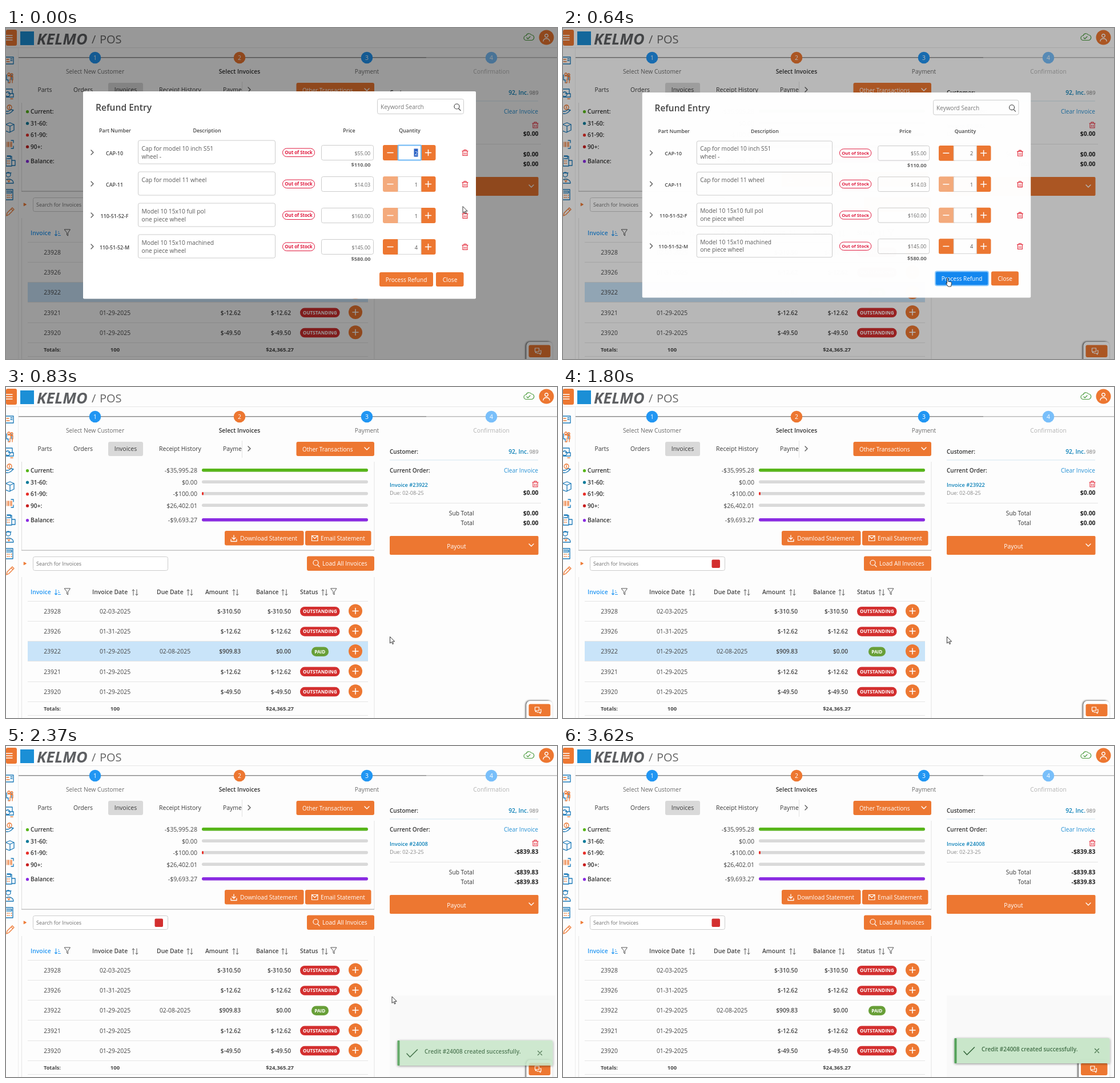
These frames come from a looping animation (965 by 580 pixels, 4320 ms). An HTML page:

```html
<!DOCTYPE html>
<html lang="en">
<head>
<meta charset="utf-8">
<title>Refund entry</title>
<style>
html, body { margin: 0; width: 100%; height: 100%; overflow: hidden; background: #fdfdfd; }
svg { display: block; font-family: "Open Sans", "Noto Sans", sans-serif; }
</style>
</head>
<body>
<svg id="stage" width="965" height="580" viewBox="0 0 965 580"></svg>
<script>
const ORANGE = '#ed7731', BLUE = '#2196f3', RED = '#d32f2f', INK = '#444';

// drawing helpers: each returns SVG markup
const text = (x, y, s, size = 10.4, fill = INK, weight = 400, anchor = 'start', extra = '') =>
  `<text x="${x}" y="${y}" font-size="${size}" fill="${fill}" font-weight="${weight}" text-anchor="${anchor}" ${extra}>${s}</text>`;
const mid = (x, y, s, size, fill, weight) => text(x, y, s, size, fill, weight, 'middle');
const end = (x, y, s, size, fill, weight) => text(x, y, s, size, fill, weight, 'end');
const rect = (x, y, w, h, fill, r = 0, extra = '') =>
  `<rect x="${x}" y="${y}" width="${w}" height="${h}" rx="${r}" fill="${fill}" ${extra}/>`;
const box = (x, y, w, h, stroke = '#ccc', r = 3) =>
  rect(x + .5, y + .5, w - 1, h - 1, '#fff', r, `stroke="${stroke}"`);
const disc = (x, y, r, fill) => `<circle cx="${x}" cy="${y}" r="${r}" fill="${fill}"/>`;
const path = (d, stroke = INK, w = 1.2, fill = 'none') =>
  `<path d="${d}" stroke="${stroke}" stroke-width="${w}" fill="${fill}" stroke-linecap="round" stroke-linejoin="round"/>`;
const line = (x1, y, x2, c = '#e5e5e5', w = 1) => rect(x1, y, x2 - x1, w, c);
const group = (id, body, extra = '') => `<g id="${id}" ${extra}>${body}</g>`;

// icons
const down = (x, y, c) => path(`M${x - 4} ${y - 2}l4 4 4-4`, c, 1.4);
const right = (x, y) => path(`M${x - 2} ${y - 4}l4 4-4 4`, '#555', 1.3);
const plus = (x, y, s = 5) => path(`M${x - s} ${y}h${2 * s}M${x} ${y - s}v${2 * s}`, '#fff', 1.5);
const minus = (x, y) => path(`M${x - 5} ${y}h10`, '#fff', 1.5);
const lens = (x, y, c) => path(`M${x + 3} ${y + 3}l3 3M${x + 4} ${y - 1}a4.5 4.5 0 1 1-9 0a4.5 4.5 0 1 1 9 0`, c, 1.2);
const trash = (x, y) => path(`M${x - 5} ${y - 3}h10M${x - 2} ${y - 3}v-2h4v2M${x - 4} ${y - 3}v8h8v-8M${x - 1.4} ${y}v3M${x + 1.4} ${y}v3`, '#e32636', 1.1);
const sort = (x, y) => path(`M${x - 3} ${y + 5}v-10l-2 2m2-2l2 2M${x + 3} ${y - 5}v10l-2-2m2 2l2-2`, '#555', 1);
const filter = (x, y) => path(`M${x - 5} ${y - 6}h10l-4 6v5l-2-1.5v-3.5z`, '#555', 1);
const cloud = path('M911 21.5a4 4 0 0 1 0-8a5 5 0 0 1 9-1.5a4.7 4.7 0 0 1 0 9.5zM912 17l2 2 4-4', '#4a9b3c', 1.2);

const button = (x, y, w, h, label, tx, size = 10.2) =>
  rect(x, y, w, h, ORANGE, 3) + text(tx, y + h / 2 + 4, label, size, '#fff');

function header() {
  const steps = [[156, 'Select New Customer', BLUE, '#6b6b6b'], [409, 'Select Invoices', ORANGE, '#333'],
                 [632, 'Payment', BLUE, '#6b6b6b'], [850, 'Confirmation', '#79bffa', '#b3b3b3']];
  return rect(0, 3, 19, 28, ORANGE, 3) + path('M0 13h11M0 17h11M0 21h11', '#fff', 1.5) +
    rect(25, 6, 24, 24, '#1b8fd6') +
    text(54, 28.5, 'KELMO', 27, '#5d5f62', 700, 'start', 'font-style="italic"') +
    text(150, 26.5, '/', 20, '#666') + text(164, 26.5, 'POS', 20, '#666') +
    cloud + disc(946.5, 16.5, 13, ORANGE) +
    path('M941 23c0-6 11-6 11 0M949.3 13.5a2.8 2.8 0 1 1-5.6 0a2.8 2.8 0 1 1 5.6 0', '#fff', 1.4) +
    line(0, 34, 965, '#e6e6e6') + rect(21, 35, 1, 545, '#ececec') +
    line(22, 51, 736, '#8c8c8c', 1.5) + line(736, 51, 965, '#bcbcbc', 1.5) +
    steps.map(([x, s, c, ink], i) => disc(x, 52, 10.3, c) + mid(x, 56, i + 1, 10.5, '#fff') +
      mid(x, 80, s, 10.3, ink, i == 1 ? 600 : 400)).join('');
}

function sidebar() {
  const shapes = [
    ['M0 51h13v12h-13M8 54h3M8 57h3', 'M1 59h5M1 55h4'],
    ['M1 82v9h3v4M10 82v9', 'M5 79a2 2 0 1 0 .1 0M3 84h5v6h-1v6h-3M10 80a2 2 0 1 0 .1 0M9 85h3v6h-1v5'],
    ['M0 107h11v7M0 121h13v-6h-9M3 112a4 4 0 1 0 .1 0', 'M8 124h4'],
    ['M0 150c5 1 8-1 13-6l-4-1-5 3h-4', 'M6 135a4 4 0 1 0 .1 0M6 137v4'],
    ['M-1 169l8-3 7 3v10l-8 4-7-3M-1 169l8 3 7-3M7 172v10', ''],
    ['M9 197h4v4M13 207v4h-4', 'M0 200v8M3 200v8M5 200v8M8 200v8M10 200v8'],
    ['M0 227v15h10v-17h-8M10 232h6v9h-6M2 224h6v5h-6', 'M2 233h1M5 233h1M2 237h1M5 237h1'],
    ['M8 257a4 4 0 1 1-8 0a4 4 0 1 1 8 0M0 254h9M0 266c6-3 13 0 13 6h-13', 'M3 266l2 4 2-4'],
    ['M0 283h12v18h-12M1 286h9v3h-9', 'M2 293h1M5 293h1M9 293h1M2 297h1M5 297h1M9 297h1'],
    ['', 'M1 329l1-5 9-9 3 3-9 9-4 2M9 317l3 3']];
  return shapes.map(([a, b]) => path(a, '#1878b8', 1.3) + path(b, ORANGE, 1.3)).join('');
}

function balances() {
  const rows = [[146, 'Current:', '-$35,995.28', '#57b51a', 291], [166.5, '31-60:', '$0.00', '#0f7b9a', 0],
                [187, '61-90:', '-$100.00', '#e8302a', 3], [207.5, '90+:', '$26,402.01', '#c81e1e', 0],
                [233, 'Balance:', '-$9,693.27', '#8a2be2', 291]];
  return rect(27, 131, 1, 155, '#ddd') + rect(644.5, 131, 1, 155, '#e4e4e4') + line(27, 285.5, 645, '#bbb', 1.3) +
    rows.map(([y, s, v, c, w]) => disc(37.5, y + .7, 2.6, c) + text(43, y + 4, s, 10.2, '#333', 600) +
      end(335, y + 4, v, 10.6) + rect(343, y - 3, 291, 5.5, '#d9d9d9', 2.7) +
      rect(343, y - 3, w, 5.5, c, Math.min(2.7, w / 2))).join('') +
    button(383, 252, 138.5, 25.5, 'Download Statement', 410) +
    path('M399 260v7l-3-3m3 3l3-3M394 267v3.5h10v-3.5', '#fff', 1.3) +
    button(524, 252, 115.5, 25.5, 'Email Statement', 551) +
    path('M535.5 260.5h10.5v9h-10.5zl5.2 5 5.3-5', '#fff', 1.2);
}

function tabs() {
  return rect(179, 96, 61, 25, '#d9d9d9', 3) +
    [[68, 'Parts'], [135, 'Orders'], [209.5, 'Invoices'], [305, 'Receipt History']]
      .map(([x, s]) => mid(x, 112, s, 10.5, '#3a3a3a', 500)).join('') +
    text(380, 112, 'Payme', 10.4, '#3a3a3a', 500) + rect(413, 94, 1, 30, '#e2e2e2') + right(426, 108) +
    button(508.5, 96, 136.5, 25, 'Other Transactions', 519, 10) + down(632, 108, '#fff');
}

function invoices() {
  const cols = [[43, 'Invoice'], [151, 'Invoice Date', 226], [264, 'Due Date', 322],
                [349, 'Amount', 402], [438, 'Balance', 488], [515, 'Status', 558]];
  const rows = [['23928', '02-03-2025', '$-310.50'], ['23926', '01-31-2025', '$-12.62'],
                ['23922', '01-29-2025', '$909.83'], ['23921', '01-29-2025', '$-12.62'],
                ['23920', '01-29-2025', '$-49.50']];
  return path('M31.5 307l4 2.3-4 2.3z', ORANGE, 1, ORANGE) + box(47, 297, 237, 25) +
    text(53, 313, 'Search for Invoices', 9, '#6f6f6f') + rect(260.5, 302.5, 14.5, 14.5, RED, 2, 'id="badge"') +
    button(527, 296.5, 118, 25.5, 'Load All Invoices', 554) + lens(543, 309, '#fff') +
    rect(27, 333, 1, 247, '#e4e4e4') + rect(644.5, 333, 1, 247, '#e4e4e4') +
    cols.map(([x, s, at], i) => text(x, 363, s, 10.4, i ? '#444' : BLUE, 600) + (at ? sort(at, 360) : '')).join('') +
    path('M87.5 355v9l-2-2m2 2l2-2M91.5 357h1M91.5 360h2.5M91.5 363.5h4', BLUE, 1.1) +
    filter(107.5, 359) + filter(574, 359) +
    rect(38, 445.5, 596, 35, '#c9e4f9', 0, 'id="selected"') +
    [375, 410, 445, 480, 516, 551, 575].map(y => line(38, y, 634)).join('') +
    rows.map(([id, date, sum], i) => {
      const y = 393 + i * 35.2, paid = i == 2;
      return mid(81, y + 4, id, 10.4) + mid(191, y + 4, date, 10.4) +
        (paid ? mid(296, y + 4, '02-08-2025', 10.4) : '') +
        end(411, y + 4, sum, 10.2, INK, 600) + end(499, y + 4, paid ? '$0.00' : sum, 10.2, INK, 600) +
        (paid ? rect(535, y - 8, 30, 16.5, '#689f38', 8) : rect(515, y - 8, 69.5, 16.5, RED, 8)) +
        mid(549.8, y + 3.2, paid ? 'PAID' : 'OUTSTANDING', 8.2, '#fff', 700) +
        disc(612, y - .5, 12, ORANGE) + plus(612, y - .5);
    }).join('') +
    text(66, 567, 'Totals:', 9.2, INK, 700) + mid(191, 567, '100', 9.5, INK, 700) + end(504, 567, '$24,365.27', 9.5, INK, 700);
}

function order() {
  return text(672, 117, 'Customer:', 10, '#333', 600) + end(915, 117, '92, Inc.', 10.3, '#0a80b8', 600) +
    end(932.5, 117, '989', 9.4, '#777') + rect(672, 127.5, 260, 1, '#d3e7f2') +
    text(672, 150, 'Current Order:', 10, '#333', 600) + end(932, 150, 'Clear Invoice', 10.1, '#2490d4') +
    text(672, 175, '', 9.3, '#0a80b8', 600, 'start', 'id="invoice"') +
    text(672, 189, '', 9.2, '#888', 400, 'start', 'id="due"') + trash(927, 170) + line(672, 203, 937) +
    [[189, ''], [225, 'Sub Total'], [242, 'Total']].map(([y, s]) => end(819.5, y, s, 10.2, '#333') +
      text(932.5, y, '', 10.4, '#222', 700, 'end', 'class="sum"')).join('') +
    rect(672, 261, 260.5, 33, ORANGE, 2) + mid(789, 282.5, 'Payout', 10.3, '#fff') + down(920, 277, '#fff');
}

function modal() {
  const rows = [['CAP-10', 'Cap for model 10 inch S51', 'wheel -', '$55.00', 2, '$110.00'],
                ['CAP-11', 'Cap for model 11 wheel', '', '$14.03', 1, ''],
                ['110-51-52-F', 'Model 10 15x10 full pol', 'one piece wheel', '$160.00', 1, ''],
                ['110-51-52-M', 'Model 10 15x10 machined', 'one piece wheel', '$145.00', 4, '$580.00']];
  return rect(135, 111, 688, 363.5, '#fff', 2) + text(157, 144.5, 'Refund Entry', 15.6, INK, 600) +
    box(650, 124, 152, 27) + text(656, 142, 'Keyword Search', 10.2, '#777') + lens(790, 138.5, '#444') +
    [[191, 'Part Number'], [352, 'Description'], [601, 'Price'], [707, 'Quantity']]
      .map(([x, s]) => mid(x, 182.5, s, 8.9, INK, 600)).join('') +
    rows.map(([part, a, b, price, n, total], i) => {
      const y = 218.5 + i * 55;
      return right(151, y - .5) + mid(190, y + 4, part, 8.9, INK, 600) + box(231, y - 22, 241, 42) +
        text(237.5, y - 4, a, 10.3, '#5a5a5a') + text(237.5, y + 10, b, 10.3, '#5a5a5a') +
        rect(484.5, y - 7.5, 56, 14.5, '#fff', 7.2, 'stroke="#e0173c"') +
        mid(512.5, y + 2.8, 'Out of Stock', 7.9, '#e0173c', 700) +
        box(552, y - 13.5, 92, 27) + end(638, y + 4, price, 8.8, '#666') + end(638.5, y + 24.5, total, 9.2, '#666', 700) +
        rect(660, y - 13.5, 30, 27, n > 1 ? ORANGE : '#f4aa7c', 3) + rect(724, y - 13.5, 28.5, 27, ORANGE, 3) +
        box(686, y - 13.5, 41.5, 27, '#d5d5d5', 0) +
        (i ? '' : group('focus', rect(686.5, y - 13, 40.5, 26, 'none', 1, 'stroke="#6db8f5" stroke-width="2"')) +
          rect(714.5, y - 7, 7, 14, '#2b62c4', 0, 'id="mark"')) +
        text(721, y + 4, n, 9.3, '#555', 400, 'end', `id="qty${i}"`) +
        minus(673, y) + plus(739.5, y) + trash(804, y);
    }).join('') +
    group('rules', [[246, 749], [301, 749], [355, 796], [410, 749]].map(([y, x]) => line(653, y, x)).join('')) +
    rect(654, 428, 94, 25, ORANGE, 3, 'id="process" stroke-width="2"') + mid(701, 444.5, 'Process Refund', 10.1, '#fff') +
    rect(753, 428, 48.5, 25, ORANGE, 3) + mid(777.5, 444.5, 'Close', 10.2, '#fff');
}

const chat = rect(0, 550, 70, 50, '#fff', 7, 'id="card" filter="url(#deep)"') +
  rect(0, 555.5, 40, 21.5, ORANGE, 3, 'id="chatButton"') +
  group('chatIcon', path('M-5-5h7v6h-4l-2 2v-2h-1zM4-1h1.5v5h-1v2l-2-2h-4v-1', '#fff', 1.2));

const toast = rect(685.5, 512, 272, 44, '#c8e6c9', 2, 'filter="url(#soft)"') + rect(685.5, 512, 4, 44, '#4f9f55', 1) +
  path('M702 535l5.5 6 13-13', '#2f6336', 1.6) + text(733, 535, 'Credit #24008 created successfully.', 10, '#3d6b43', 600) +
  path('M931.5 530.5l7 7m0-7l-7 7', '#3d6b43', 1.2);

const cursor = group('arrow', path('M0 0v11l2.7-2.4 1.8 4 1.7-.8-1.8-3.9h3.4z', '#222', .9, '#fff')) +
  group('hand', path('M2.500 9v-8a1 1 0 0 1 2 0v5l5 1q1.5 .5 1 2.5l-1 5.5h-5l-3.5-5q-1-2 1.5-1z', '#222', .9, '#fff'));

const shadow = (id, dx, dy, blur, alpha) => `<filter id="${id}" x="-20%" y="-40%" width="140%" height="180%">
  <feDropShadow dx="${dx}" dy="${dy}" stdDeviation="${blur}" flood-opacity="${alpha}"/></filter>`;

const stage = document.getElementById('stage');
stage.innerHTML = shadow('soft', 0, 1, 2, .45) + shadow('deep', -1.5, -.5, 1.5, .75) +
  rect(0, 0, 965, 580, '#fdfdfd') + header() + sidebar() + tabs() + balances() + invoices() + order() +
  rect(672, 437, 290, 143, '#f9f9f9', 0, 'id="shade"') + group('chat', chat) + group('toast', toast) +
  rect(0, 0, 965, 580, '#000', 0, 'id="mask"') + group('modal', modal()) + group('cursor', cursor);

const $ = id => document.getElementById(id);
const set = (id, name, value) => $(id).setAttribute(name, value);
const show = (id, on) => set(id, 'visibility', on ? 'visible' : 'hidden');

// held steps: the last entry whose time has passed
const held = (steps, t) => steps.filter(s => s[0] <= t).pop().slice(1);

const pointer = [[0, 800, 313], [80, 790, 325], [170, 763, 354], [260, 728, 389], [350, 698, 417],
  [440, 679, 433, 1], [540, 670, 438, 1], [830, 672.5, 438], [2370, 676, 439.5], [2460, 704, 462], [2560, 746, 498],
  [2650, 764, 514], [2750, 772, 521], [2850, 776, 524], [3410, 812, 543], [3510, 890, 567], [3620, 940, 600]];
const fade = [[0, 1, 1, .4], [640, .989, .99, .28], [720, .718, .06, .02], [830, .7, 0, 0]]; // scale, opacity, mask
const rise = [[0, 0], [2180, .1], [2270, .55], [2370, .9], [2460, 1]];

function draw(t) {
  const [x, y, hand] = held(pointer, t);
  set('cursor', 'transform', `translate(${x} ${y})`);
  show('hand', hand);
  show('arrow', !hand);

  const [scale, alpha, dark] = held(fade, t);
  set('modal', 'transform', `translate(479 292.5) scale(${scale}) translate(-479 -292.5)`);
  set('modal', 'opacity', alpha);
  set('mask', 'opacity', dark);
  show('focus', t < 640);
  show('mark', t < 540);
  set('qty0', 'fill', t < 540 ? '#fff' : '#555');
  show('rules', t >= 540 && t < 640);
  set('process', 'fill', t < 440 ? ORANGE : '#1287f0');
  set('process', 'stroke', t < 640 ? 'none' : '#8ac8fb');

  const credited = t >= 2090;
  show('selected', !credited);
  show('badge', t >= 1800);
  $('invoice').textContent = credited ? 'Invoice #24008' : 'Invoice #23922';
  $('due').textContent = credited ? 'Due: 02-23-25' : 'Due: 02-08-25';
  for (const el of document.querySelectorAll('.sum')) el.textContent = credited ? '-$839.83' : '$0.00';

  const [p] = held(rise, t);
  show('shade', p > 0);
  set('toast', 'opacity', p * .97);
  set('toast', 'transform', `translate(0 ${40 * (1 - p)})`);

  const left = t >= 3510 ? 907 : 915.5;
  set('card', 'x', left - 4);
  set('card', 'width', 961 - left);
  set('chatButton', 'x', left);
  set('chatButton', 'width', 953.5 - left);
  set('chatIcon', 'transform', `translate(${left > 910 ? 931.5 : 929} 566)`);
}

let start;
function tick(now) {
  start ??= now;
  draw((now - start) % 4320);
  requestAnimationFrame(tick);
}
draw(0);
requestAnimationFrame(tick);
</script>
</body>
</html>
```
